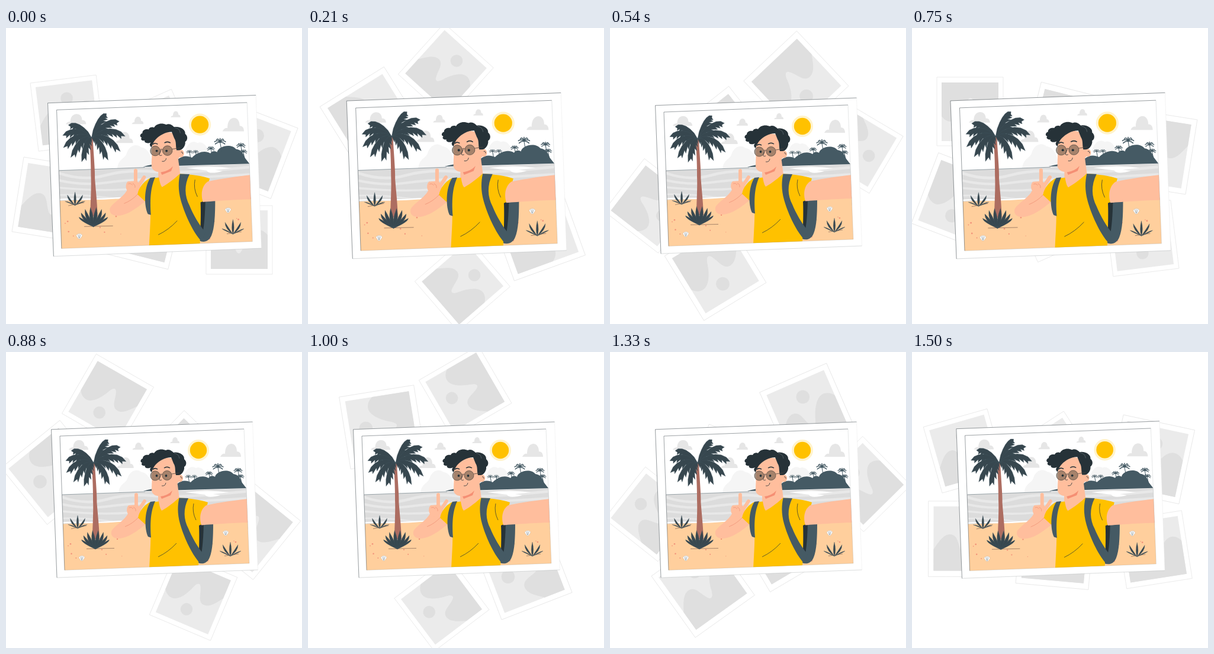
Recreate the animation shown at these times as an HTML page. Size 500 by 500 pixels, loop 1.54 s.

```html
<!DOCTYPE html>
<html lang="en">
<head>
<meta charset="utf-8">
<title>Holiday photo</title>
<style>
html, body { margin: 0; width: 100%; height: 100%; overflow: hidden; background: #fff; }
svg { display: block; width: 100vw; height: 100vh; }
</style>
</head>
<body>
<svg viewBox="0 0 500 500" xmlns="http://www.w3.org/2000/svg">
  <defs>
    <clipPath id="view"><path d="M91 142 402 130 411 357 99 368.500Z"/></clipPath>
    <g id="card">
      <path d="M0 0H112V116H0Z" fill="#fff" stroke="#e4e4e4" stroke-width=".7"/>
      <path d="M8 8H104V107H8Z" fill="#ebebeb"/>
      <path d="M8 74C14 66 22 51 33 51 45 51 45 64 50 75 53 83 58 83 62 72 68 55 78 40 90 41 97 42 101 46 104 50V107H8Z" fill="#dfdfdf"/>
      <circle cx="58" cy="33" r="10.300" fill="#dfdfdf"/>
    </g>
    <path id="cloud" d="M-17 11C-15 6-11 5-9 6-9-3-6-10 1-11 8-11 11-5 11 2 16 2 18 6 18 11Z"/>
    <g id="shell">
      <path d="M-5-1C-4-5 4-6 5-1L1.500 4H-1.500Z" fill="#fff" stroke="#b9a48f" stroke-width=".4"/>
      <path d="M-.5 3-2.500-3M0 3V-3.500M.5 3 2.500-3" fill="none" stroke="#455a64" stroke-width=".4"/>
    </g>
  </defs>

  <g id="cards"></g>

  <g id="photo">
    <path d="M76.500 130.800 416.500 118 425.500 368 86 381.200Z" fill="#fff" stroke="#e3e3e3" stroke-width=".4"/>
    <path d="M416.500 118 76.500 130.800 86 381.200" fill="none" stroke="#263238" stroke-width=".45"/>
    <path d="M86 381.200 425.500 368" stroke="#263238" stroke-opacity=".3" stroke-width=".4"/>
    <g clip-path="url(#view)">
      <path d="M80 120H420V380H80Z" fill="#fff"/>
      <path d="M190 238C192 222 202 222 205 214 209 200 221 196 229 203 238 204 245 212 250 238ZM300 212C303 200 310 190 321 196 330 192 338 202 340 214Z" fill="#f5f5f5"/>
      <g fill="#e6e6e6">
        <use href="#cloud" transform="translate(122 157) scale(.95 .75)"/>
        <use href="#cloud" transform="translate(223 159) scale(.55)"/>
        <use href="#cloud" transform="translate(285 149) scale(.45)"/>
        <use href="#cloud" transform="translate(379 166)"/>
        <use href="#cloud" transform="translate(201 187) scale(.82)"/>
      </g>
      <circle cx="325" cy="166" r="18" fill="#ffc100" opacity=".2"/>
      <circle cx="325" cy="166" r="14.200" fill="#ffc100"/>

      <path d="M90 241 410 230V300H90Z" fill="#dcdcdc"/>
      <g id="waves" fill="none" stroke="#e8e8e8"></g>
      <path d="M303 237Q340 232 377 237L350 240 362 242Q340 248 336 241Z" fill="#fff"/>
      <path d="M95 241 235 236" stroke="#455a64" stroke-width=".5"/>
      <path d="M232 235C250 229 270 230 290 222 296 217 304 216 312 220 322 210 334 208 342 213 346 208 350 209 353 211 355 201 376 196 384 206 393 207 396 214 399 221L406 230Z" fill="#455a64"/>
      <g id="isle" fill="none" stroke="#455a64" stroke-linecap="round"></g>

      <path d="M90 291C120 289 140 290 170 288 220 285 260 286 300 288L420 284V380H90Z" fill="#ffcf9d"/>
      <path d="M95 288.500C122 286 150 290 190 286L240 284" fill="none" stroke="#fff" stroke-width="2.200"/>
      <g id="dots" fill="#f2937a"></g>
      <use href="#shell" x="128" y="348.500"/>
      <use href="#shell" x="371" y="306"/>
      <path d="M136 332.500 183 331.500M110 298.500 136 293.500M369 344.500 393 341" stroke="#6b5348" stroke-width=".6"/>
      <path d="M144 187H150C151 210 154 240 153.500 255 155 275 157 290 158 316H146C146 295 148 270 147 250 147 225 146 205 144 187Z" fill="#ad6d61"/>
      <g id="plants" fill="#37474f" stroke="#455a64" stroke-width=".3"></g>

      <g fill="#ffbe9d">
        <path d="M206 273C200 285 182 294 178 303 176 313 186 317 197 314 212 311 228 297 236 291L223 278 228 270Z"/>
        <path d="M205 262C202 271 207 278 216 278 226 278 231 269 226 262L222 258 207 259Z"/>
        <path d="M220 241V263M234 252 224 267" stroke="#ffbe9d" stroke-width="5.800" stroke-linecap="round"/>
        <path d="M257 235 288 210 293 248 264 272 257 254Z"/>
      </g>
      <path d="M208 263Q212 261 215 265M215 262Q220 264 219 269M224 279Q214 290 201 295" fill="none" stroke="#ee8f73" stroke-width=".7"/>

      <path d="M327 291 350 288C350 315 349 335 344 347 340 357 332 359 324 356Z" fill="#455a64"/>
      <path d="M326 291 334 290Q333 325 330 340L318 325Z" fill="#263238"/>
      <path d="M242 254C231 261 225 270 223 280L235 291 243 286C246 310 243 340 242 367L325 362C326 340 327 310 326 293L331 291 341 254C330 250 310 247 292 246.500 286 252 274 262 263 268 260 264 259 258 258 252.500Z" fill="#ffc100"/>
      <path d="M338 259C360 254 390 250 414 247.500V288C385 288.500 350 291 330 292.500 326 280 328 266 338 259Z" fill="#ffbe9d"/>
      <path d="M292.500 246.500 308 247C299 265 300 283 308 298 314 313 324 330 334 342L328 357C312 340 299 308 294 290 289 272 290 258 292.500 246.500Z" fill="#455a64"/>
      <path d="M244 253 252 252C245 268 243 285 245 313.500L240 312C234 300 233 270 244 253Z" fill="#455a64"/>
      <path d="M257 346Q274 338 288 323M317 256Q314 270 321 284" fill="none" stroke="#263238" stroke-width=".7"/>

      <path d="M247 192 246 234C247 242 256 244.500 264 243 273 241 282 234 286 226L292 219C300 222 302 208 294 207L288 208 284 180 262 177Z" fill="#ffbe9d"/>
      <path d="M261 244Q274 242 281 234L278 242 263 248Z" fill="#f58f74"/>
      <path d="M246 203C242 200 243 197 245 195 239 198 233 195 235 192 231 193 227 190 230 187 226 186 227 181 231 180 231 174 238 173 241 174 243 169 249 170 250 171 254 164 263 163 270 166 276 163 281 168 283 170 292 168 302 174 301 181 306 185 305 192 301 194 302 200 297 208 291 208L287 208C285 200 287 194 283 188L279 178C268 178 259 184 253 190 250 193 248 197 246 203Z" fill="#263238"/>
      <path d="M284 171Q292 172 293 180" fill="none" stroke="#78858a" stroke-width=".5"/>
      <g fill="#7d6655" fill-opacity=".68" stroke="#4b4640" stroke-width=".7">
        <circle cx="252" cy="209" r="8"/>
        <circle cx="272" cy="208.500" r="8"/>
      </g>
      <path d="M260 207Q262 205 264 207M280 206 293 204" fill="none" stroke="#4b4640" stroke-width=".8"/>
      <circle cx="254.500" cy="209" r="1.900" fill="#263238"/>
      <circle cx="270.500" cy="209" r="1.900" fill="#263238"/>
      <path d="M262 207 258.500 215.500Q260 217.500 263 216M263 226Q269 227 270 221M294 211Q297 210 297 214" fill="none" stroke="#263238" stroke-width=".8"/>
      <path d="M248 198.500Q251 195 256 198M267 196Q272 192.500 277 196" fill="none" stroke="#263238" stroke-width="1.500"/>
    </g>
    <path d="M402 130 91 142 99 368.500" fill="none" stroke="#263238" stroke-width=".45"/>
    <path d="M402 130 411 357 99 368.500" fill="none" stroke="#263238" stroke-opacity=".3" stroke-width=".4"/>
  </g>
</svg>
<script>
const LOOP = 1540, STEPS = 37, CYCLE = 1500, RAD = Math.PI / 180;
const $ = id => document.getElementById(id);
const fill = (id, parts) => { $(id).innerHTML = parts.join(''); };
const range = (n, fn) => Array.from({ length: n }, (_, i) => fn(i));
let seed = 11;
const rand = () => (seed = seed * 16807 % 2147483647) / 2147483647;

// x, y, tilt, scale
fill('cards', [
  [177, 149, -24, 1], [185, 254, 14, 1.1], [41, 93, -7, 1],
  [30, 218, 9, 1.1], [378, 125, 21, 1.1], [338, 300, 0, 1]
].map(([x, y, r, s]) =>
  `<use href="#card" transform="translate(${x} ${y}) rotate(${r}) scale(${s})"/>`));

// drooping palm leaf with a toothed underside; side is 1 (right) or -1 (left)
function frond(side, angle, r) {
  const ox = 148, oy = 187, n = 6;
  const tx = r * Math.cos(angle * RAD), ty = r * Math.sin(angle * RAD);
  const cx = tx * 0.6, cy = ty * 0.5 - r * 0.36;
  const at = (t, off) => {
    const u = 1 - t, dx = u * cx + t * (tx - cx), dy = u * cy + t * (ty - cy);
    const k = off / Math.hypot(dx, dy);
    const x = 2 * u * t * cx + t * t * tx - dy * k, y = 2 * u * t * cy + t * t * ty + dx * k;
    return `L${ox + side * x} ${oy + y}`;
  };
  let low = '', top = '';
  for (let i = 1; i < n; i++) {
    const t = i / n, h = 10 * Math.sin(Math.PI * (0.12 + 0.75 * t));
    low += at(t + 0.12, h) + at(t + 0.06, h * 0.5);
    top = at(t, -h * 0.35) + top;
  }
  return `<path d="M${ox} ${oy}${low}${at(1, 0)}${top}Z"/>`;
}

// fan of n pointed blades
const tuft = (x, y, n, spread, len, w) => range(n, i => {
  const a = spread * (2 * i / (n - 1) - 1) * RAD, l = len * (0.5 + 0.5 * Math.cos(a));
  const tx = x + l * Math.sin(a) * 1.15, ty = y - l * Math.cos(a);
  const mx = x + (tx - x) * 0.75, my = y - l * 0.4;
  return `<path d="M${x} ${y}Q${mx - w} ${my} ${tx} ${ty}Q${mx + w} ${my} ${x} ${y}Z"/>`;
}).join('');

fill('plants', [
  ...range(5, i => frond(1, -58 + 28 * i, 46 + 9 * Math.sin(i * Math.PI / 4))),
  ...range(5, i => frond(-1, -28 + 24 * i, 43 + 6 * Math.sin(i * Math.PI / 4))),
  tuft(121, 298, 5, 65, 22, 3.5),
  tuft(151, 333, 8, 52, 32, 6),
  tuft(379, 345, 5, 60, 24, 3.5)
]);

// small palms: head x, y and size
fill('isle', [[308, 211, 5], [318, 211, 5], [343, 206, 6], [358, 195, 9], [392, 201, 7], [396, 211, 6]]
  .map(([x, y, s]) => {
    const leaves = range(7, i => {
      const a = (150 + i * 40) * RAD, dx = s * Math.cos(a), dy = s * 0.6 * Math.sin(a);
      return `M${x} ${y}q${dx / 2} ${dy - s * 0.4} ${dx} ${dy}`;
    }).join('');
    return `<path d="M${x} ${y}l${s * 0.3} ${s * 1.7}" stroke-width="1"/><path d="${leaves}" stroke-width="${s * 0.17}"/>`;
  }));

fill('waves', range(4, i =>
  `<path d="M94 ${245 + 12 * i}q40 ${14 - 5 * i} 76 4t80-6t160 -8" stroke-width="${4.5 - i * 0.6}"/>`));
fill('dots', range(16, () =>
  `<circle cx="${105 + rand() * 295}" cy="${305 + rand() * 50}" r="${0.6 + rand() * 0.8}"/>`));

// step to time: the turn is slightly uneven
const CLOCK = [[0, 0], [13, 532], [18, 750], [28, 1166], [37, 1500]];
function clock(step) {
  const i = CLOCK.findIndex(p => p[0] > step);
  const [a, b] = [CLOCK[i - 1], CLOCK[i]];
  return a[1] + (b[1] - a[1]) * (step - a[0]) / (b[0] - a[0]);
}

// linear rise and fall around a peak
const pulse = (p, peak, rise, fall) =>
  Math.max(0, p < peak ? 1 - (peak - p) / rise : 1 - (p - peak) / fall);

function draw(t) {
  const c = clock(Math.floor((t + 5) * STEPS / LOOP) % STEPS);
  const p = (c + 51) % CYCLE / CYCLE;
  const s = 1 + 0.1 * (pulse(p, 0.1, 0.1, 0.2) + pulse(p, 0.5, 0.1, 0.1));
  $('cards').setAttribute('transform', `rotate(${c / CYCLE * 360} 246 249.500)`);
  $('photo').setAttribute('transform', `translate(251 249.500) scale(${s}) translate(-251 -249.500)`);
}
function tick() {
  draw(performance.now() % LOOP);
  requestAnimationFrame(tick);
}
tick();
</script>
</body>
</html>
```
